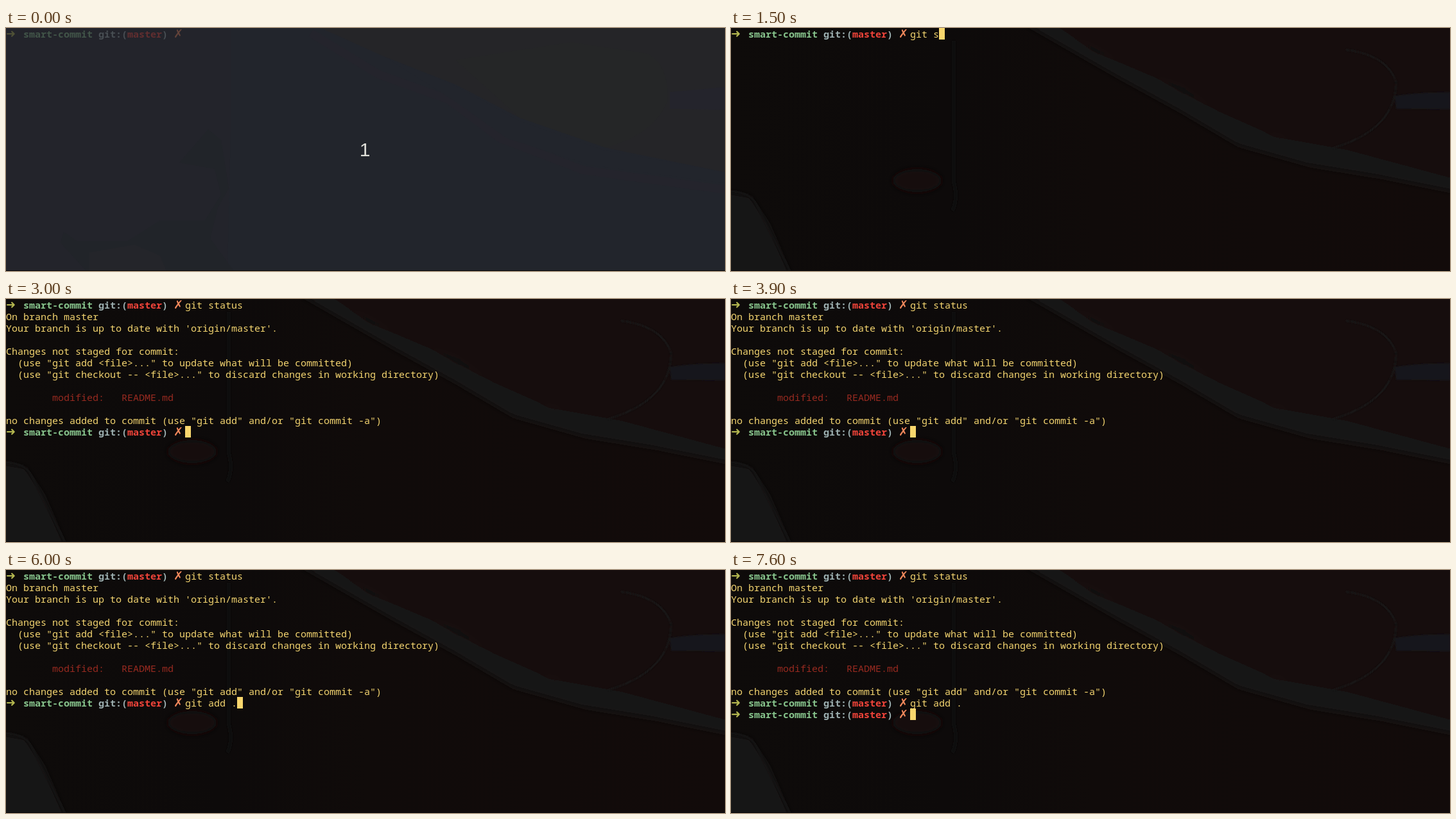
An HTML page that plays this animation: 1120 px wide and 379 px high, repeating every 8000 ms.

```html
<!DOCTYPE html>
<html lang="en">
<head>
<meta charset="utf-8">
<title>Terminal session</title>
<style>
  html, body { margin: 0; width: 100%; height: 100%; overflow: hidden; background: #0e0a0a; }
  svg { display: block; width: 1120px; height: 379px; }
  text { font: 15px "Noto Sans Mono", "DejaVu Sans Mono", monospace; fill: #f4d570; white-space: pre; }
  .bold { font-weight: 700; }
  .symbol { font: 18px "DejaVu Sans", sans-serif; }
  .count { font: 30px "Liberation Sans", sans-serif; fill: #deded8; text-anchor: middle; }
</style>
</head>
<body>
<svg viewBox="0 0 1120 379">
  <defs>
    <filter id="soft" x="-10%" y="-10%" width="120%" height="120%"><feGaussianBlur stdDeviation="5"/></filter>
    <filter id="edge"><feGaussianBlur stdDeviation="1.2"/></filter>
    <linearGradient id="base">
      <stop offset="0" stop-color="#0e0b0a"/>
      <stop offset=".3" stop-color="#0d0a0a"/>
      <stop offset=".5" stop-color="#100b0a"/>
      <stop offset="1" stop-color="#120b0a"/>
    </linearGradient>
  </defs>

  <g id="photo">
    <rect width="1120" height="379" fill="url(#base)"/>
    <g filter="url(#soft)">
      <path d="M490 -10L600 50L700 92L790 150L900 182L1130 240V-10Z" fill="#140b0b"/>
      <path d="M780 60Q860 20 960 32Q1035 45 1035 95Q1020 165 940 186Q830 170 750 120Z" fill="#120909"/>
      <path d="M455 -8L500 -8L570 38L665 78L760 130L850 170L960 190L1130 236V256L1010 232L900 214L790 183L700 130L600 75Z" fill="#151414"/>
      <path d="M-10 255L30 262L58 305L95 390H-10Z" fill="#151212"/>
      <ellipse cx="290" cy="238" rx="38" ry="18" fill="#120a0a"/>
    </g>
    <g filter="url(#edge)" fill="none">
      <path d="M958 34Q1022 42 1036 84Q1036 158 938 187" stroke="#191616" stroke-width="3"/>
      <path d="M1034 106Q1070 100 1120 100V127L1036 126Z" fill="#15151a"/>
      <path d="M0 254Q26 256 38 272L92 379" stroke="#191515" stroke-width="2"/>
      <path d="M347 20V240Q354 265 345 285" stroke="#110e0e" stroke-width="6"/>
    </g>
  </g>

  <g id="veil">
    <rect width="1120" height="379" fill="#22252c"/>
    <path d="M0 0H350V160L345 379H0Z" fill="#23242b"/>
    <path d="M490 0H1120V225L940 188L800 140L700 88L590 45Z" fill="#252528"/>
    <path d="M700 50L880 22L1000 40Q1034 60 1030 115Q1010 165 935 187L800 140Z" fill="#252627"/>
    <path d="M475 8L580 72L690 112L770 172L900 222L1120 252" fill="none" stroke="#24242c" stroke-width="13"/>
    <path d="M590 45L700 90L800 145L930 190L1120 225V242L910 214L780 172L700 115Z" fill="#22252c"/>
    <path d="M1034 100L1120 92V128L1034 126Z" fill="#24242c"/>
    <path d="M270 210L315 158L335 175L347 250L330 280L318 328L355 379H125L85 335L90 318L110 332H190L240 300H310L335 260L325 220Z" fill="#212429"/>
    <path d="M130 350L200 338L240 355L250 379H130Z" fill="#24252a"/>
  </g>
  <path d="M0 378.5H1120" stroke="#09080a"/>

  <g id="screen"></g>
  <rect id="cursor" width="9" height="18" fill="#f8d66d"/>
  <text id="count" class="count" x="559" y="200">1</text>
</svg>

<script>
const LOOP = 8000, CELL = 9, LINE = 18, PROMPT_END = 31;
const $ = id => document.getElementById(id);

function add(parent, tag, attrs, content = '') {
  const el = document.createElementNS('http://www.w3.org/2000/svg', tag);
  for (const key in attrs) el.setAttribute(key, attrs[key]);
  el.textContent = content;
  return parent.appendChild(el);
}

function put(parent, col, row, content, color, cls = '') {
  return add(parent, 'text', {
    x: col * CELL, y: row * LINE + 15, class: cls, style: color ? `fill:${color}` : ''
  }, content);
}

function promptLine(row, command, start, typing) {
  const group = add($('screen'), 'g', {});
  put(group, 0, row, '➜', '#b5b850', 'symbol');
  put(group, 3, row, 'smart-commit', '#87c48c', 'bold');
  put(group, 16, row, 'git:(', '#9db0b1', 'bold');
  put(group, 21, row, 'master', '#f0443a', 'bold');
  put(group, 27, row, ')', '#9db0b1', 'bold');
  put(group, 29, row, '✗', '#f5895c', 'symbol');
  return { row, command, start, typing, group, input: put(group, PROMPT_END, row, '') };
}

// typing: [time, characters entered so far]
const prompts = [
  promptLine(0, 'git status', 0, [[600, 1], [800, 2], [900, 3], [1000, 4], [1500, 5],
    [1700, 6], [1900, 7], [2200, 9], [2300, 10]]),
  promptLine(11, 'git add .', 3000, [[4000, 1], [4200, 2], [4300, 4], [5000, 5],
    [5100, 7], [5500, 8], [6000, 9]]),
  promptLine(12, '', 6500, [])
];

const output = add($('screen'), 'g', {});
[
  'On branch master',
  "Your branch is up to date with 'origin/master'.",
  '',
  'Changes not staged for commit:',
  '  (use "git add <file>..." to update what will be committed)',
  '  (use "git checkout -- <file>..." to discard changes in working directory)',
  '',
  '        modified:   README.md',
  '',
  'no changes added to commit (use "git add" and/or "git commit -a")'
].forEach((line, i) => {
  const content = line.trimStart();
  const color = content.startsWith('modified') ? '#972a20' : '';
  if (content) put(output, line.length - content.length, i + 1, content, color);
});

const cursorOff = [[0, 500], [3300, 3900], [6400, 6500], [7500, 7600]];
const show = (el, on) => el.setAttribute('visibility', on ? 'visible' : 'hidden');

function render(t) {
  const waiting = t < 500;
  show($('veil'), waiting);
  show($('count'), waiting);
  $('screen').setAttribute('opacity', waiting ? 0.3 : 1);
  show(output, t >= 3000);

  for (const p of prompts) {
    const visible = t >= p.start;
    show(p.group, visible);
    const typed = p.typing.reduce((n, [time, count]) => t >= time ? count : n, 0);
    p.input.textContent = p.command.slice(0, typed);
    if (visible) {
      $('cursor').setAttribute('x', (PROMPT_END + typed) * CELL);
      $('cursor').setAttribute('y', p.row * LINE);
    }
  }
  show($('cursor'), !cursorOff.some(([from, to]) => t >= from && t < to));
}

const begin = performance.now();
function tick() {
  render((performance.now() - begin) % LOOP);
  requestAnimationFrame(tick);
}
tick();
</script>
</body>
</html>
```
